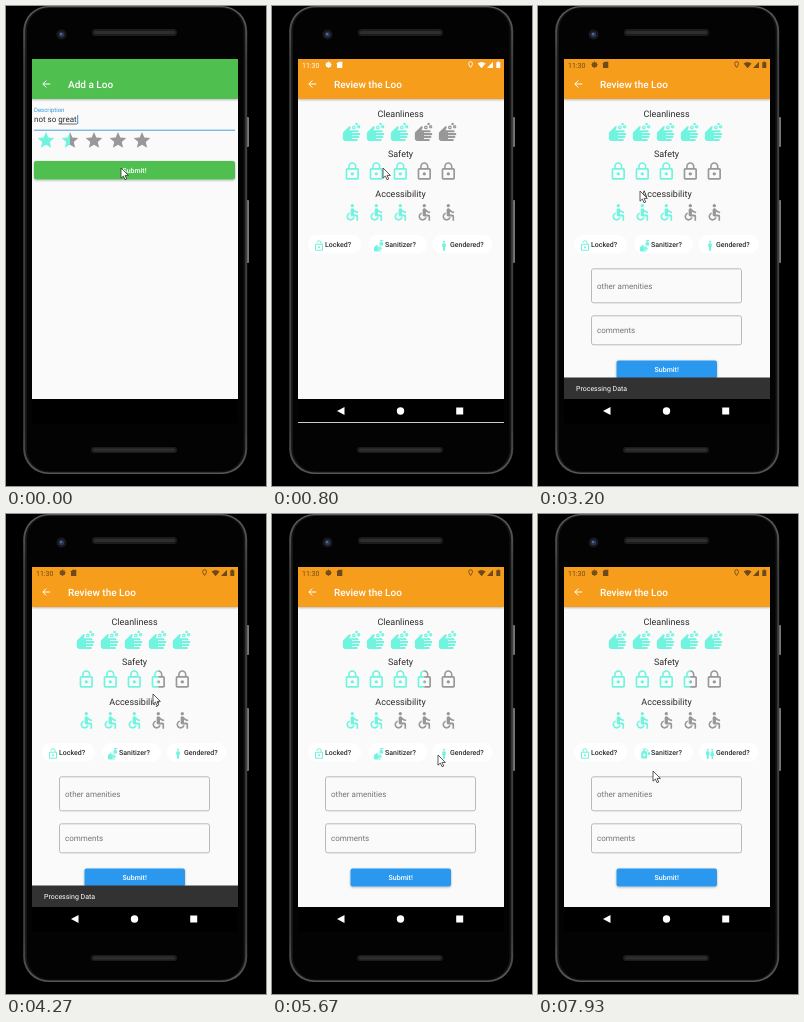
Write an HTML page that moves like this. It is 260x480 px and loops after 8 s.

```html
<!DOCTYPE html>
<html lang="en">
<head>
<meta charset="utf-8">
<title>Loo review</title>
<style>
  html, body { margin: 0; width: 100%; height: 100%; overflow: hidden; background: #000; }
  svg { display: block; width: 260px; height: 480px; font-family: Roboto, sans-serif; filter: blur(.3px); text-rendering: geometricPrecision; }
  .m { font-weight: 500; }
  .c { text-anchor: middle; }
</style>
</head>
<body>
<script>
const LOOP = 8000, STEP = 1000 / 15;
const TEAL = '#70f4df', GREY = '#989898', GREEN = '#50c04f', ORANGE = '#f79d1e', INK = '#2c2c2c';

// ---- markup helpers
const rect = (x, y, w, h, fill, r = 0, more = '') =>
  `<rect x="${x}" y="${y}" width="${w}" height="${h}" rx="${r}" fill="${fill}" ${more}/>`;
const text = (x, y, size, fill, str, cls = '') =>
  `<text x="${x}" y="${y}" font-size="${size}" fill="${fill}" class="${cls}">${str}</text>`;
const path = (d, more = '') => `<path d="${d}" ${more}/>`;
const line = (d, color, w = 1) => path(d, `fill="none" stroke="${color}" stroke-width="${w}"`);
const dot = (x, y, r, more = '') => `<circle cx="${x}" cy="${y}" r="${r}" ${more}/>`;
const ring = (x, y, r) => dot(x, y, r, 'fill="none" stroke="currentColor" stroke-width="1.5"');
const group = (id, body, more = '') => `<g id="${id}" ${more}>${body}</g>`;

// ---- icons on a 24 unit grid
const lockDot = 'M12 17c1.1 0 2-.9 2-2s-.9-2-2-2-2 .9-2 2 .9 2 2 2zm6-9h-1V6c0-2.76-2.24-5-5-5S7 3.24 7 6';
const washing = path('M9.1 5L1.9 11.8C1.3 12.4 1 13.1 1 14V20c0 1.7 1.3 3 3 3h13.75a1.25 1.25 0 0 0 0-2.5H12v-1h7.75a1.25 1.25 0 0 0 0-2.5H12v-1h8.75a1.25 1.25 0 0 0 0-2.5H12v-1h6.75a1.25 1.25 0 0 0 0-2.5H8.9L10.3 7.4Q10.8 6.600 10.200 5.900z');
const icons = {
  star: path('M12 17.27L18.18 21l-1.64-7.03L22 9.24l-7.19-.61L12 2 9.19 8.63 2 9.24l5.46 4.73L5.82 21z'),
  lock: path(lockDot + 'v2H6c-1.1 0-2 .9-2 2v10c0 1.1.9 2 2 2h12c1.1 0 2-.9 2-2V10c0-1.1-.9-2-2-2zM8.9 6c0-1.71 1.39-3.1 3.1-3.1s3.1 1.39 3.1 3.1v2H8.9V6zM18 20H6V10h12v10z'),
  open: path(lockDot + 'h1.9c0-1.71 1.39-3.1 3.1-3.1s3.1 1.39 3.1 3.1v2H6c-1.1 0-2 .9-2 2v10c0 1.1.9 2 2 2h12c1.1 0 2-.9 2-2V10c0-1.1-.9-2-2-2zm0 12H6V10h12v10z'),
  chair: dot(12, 4, 2) + path('M19 13v-2c-1.54.02-3.09-.75-4.07-1.83l-1.29-1.43c-.17-.19-.38-.34-.61-.45H13c-.35-.2-.75-.3-1.19-.26C10.76 7.11 10 8.04 10 9.09V15c0 1.1.9 2 2 2h5v5h2v-5.5c0-1.1-.9-2-2-2h-3v-3.45c1.29 1.07 3.25 1.94 5 1.95zm-6.17 5c-.41 1.16-1.52 2-2.83 2-1.66 0-3-1.34-3-3 0-1.31.84-2.41 2-2.83V12.1c-2.28.46-4 2.48-4 4.9 0 2.76 2.24 5 5 5 2.42 0 4.44-1.72 4.9-4h-2.07z'),
  hand: washing + ring(14.25, 6.75, 1.5) + ring(20, 6, 1.3) + dot(17.5, 2.5, 1.5),
  rinse: `<g transform="translate(0 6) scale(.78)">${washing}</g>` +
    path('M12 8q0-2.500 2.500-3V3H13V1h4q2.500 0 3 2h-3.500v2Q19 5.500 19 8v4h-7z'),
  bottle: path('M15.5 6.5C15.5 5.7 17 4 17 4s1.5 1.7 1.5 2.5a1.5 1.5 0 0 1-3 0zM19.5 15a2.5 2.5 0 0 0 2.5-2.5C22 10.8 19.5 8 19.5 8S17 10.8 17 12.5a2.5 2.5 0 0 0 2.5 2.5zM13 14h-2v-2H9v2H7v2h2v2h2v-2h2zM16 12v8a2 2 0 0 1-2 2H6a2 2 0 0 1-2-2v-8a6 6 0 0 1 5-5.9V4H7V2h6q1.700 0 3 1L14.600 4.500Q13.800 4 13 4h-2v2.100A6 6 0 0 1 16 12z'),
  person: dot(12, 4, 2) + path('M10 22v-7.5H8.500V9a2 2 0 0 1 2-2h3a2 2 0 0 1 2 2v5.500H14V22z'),
  pair: dot(7.5, 4, 2) + dot(16.5, 4, 2) +
    path('M5.5 22v-7.5H4V9a2 2 0 0 1 2-2h3a2 2 0 0 1 2 2v5.5H9.5V22zM18 22v-6h3l-2.5-7.600a2 2 0 0 0-4 0L12 16h3v6z'),
};
const icon = (name, x, y, size, color, more = '') =>
  `<g transform="translate(${x} ${y}) scale(${size / 24})" fill="${color}" color="${color}" ${more}>${icons[name]}</g>`;

// A row of five marks; two clips divide it into lit and unlit parts
const ratings = [];
function ratingRow(name, x, y) {
  const i = ratings.push(x) - 1;
  const layer = (side, color) =>
    `<clipPath id="${side}${i}"><rect y="${y - 3}" x="${x}" width="130" height="26"/></clipPath>` +
    `<g clip-path="url(#${side}${i})">` +
    [0, 1, 2, 3, 4].map(n => icon(name, x + n * 24, y, 20, color)).join('') + '</g>';
  return layer('on', TEAL) + layer('off', GREY);
}

const raised = (x, y, w, h, color, r) => rect(x, y, w, h, color, r, 'filter="url(#soft)"');
const appBar = (color, title) => raised(26, 53, 206, 40, color, 0) +
  line('M44.2 78H37M40.3 74.5L36.8 78l3.5 3.5', '#fff', 1) + text(62, 82, 10, '#fff', title, 'm');

// ---- keyboard
function keyboard() {
  const dark = '#ccd0d5', stroke = '#444';
  const key = (x, y, w, fill = '#fff') => rect(x, y + 1, w, 23, '#c3c6ca', 3) + rect(x, y, w, 23, fill, 3);
  const letters = (str, cx, y) => [...str].map((ch, i) =>
    key(cx + i * 20.3 - 8.8, y, 17.6) + text(cx + i * 20.3, y + 15.5, 12, '#2b2d30', ch, 'c')).join('');
  const words = ['great', 'greatly', 'greatest'];
  return rect(26, 252, 206, 142, '#e8eaed') +
    dot(38.5, 263.5, 7.5, 'fill="#fff"') + line('M37.3 260.8l2.7 2.7-2.7 2.7', '#555', 1.1) +
    words.map((w, i) => text(71 + i * 57, 267, 9, '#3c4043', w, 'c')).join('') +
    line('M98.5 258v12M158.5 258v12', '#c8cacd', 0.8) +
    rect(219.7, 258.5, 3.4, 6.5, stroke, 1.7) + line('M218 263a3.4 3.4 0 0 0 6.8 0M221.4 266.5v2.5', stroke, 0.9) +
    letters('qwertyuiop', 37.4, 278) +
    [...'1234567890'].map((d, i) => text(43.4 + i * 20.3, 284, 5, '#666', d, 'c')).join('') +
    letters('asdfghjkl', 47.5, 307) + letters('zxcvbnm', 67.6, 336.5) +
    [28, 201].map(x => key(x, 336.5, 28, dark)).join('') +
    line('M42 342.5l-5.5 6h3v4.5h5v-4.5h3z', stroke) +
    line('M212 343.5h9v9h-9l-4-4.5zM214 346l4 4m0-4l-4 4', stroke) +
    key(28, 365.5, 28, dark) + text(42, 380.5, 8, '#3c4043', '?123', 'c') +
    key(59, 365.5, 17.5, dark) + text(67.7, 380, 11, '#3c4043', ',', 'c') +
    key(79, 365.5, 17.5) + key(99, 365.5, 79) +
    key(181, 365.5, 17.5, dark) + text(189.7, 380, 11, '#3c4043', '.', 'c') +
    dot(88, 377, 4.6, 'fill="none" stroke="#444"') + line('M85.7 378.2q2.3 2.8 4.6 0', stroke, 0.9) +
    dot(86.4, 375.7, 0.7, 'fill="#444"') + dot(89.6, 375.7, 0.7, 'fill="#444"') +
    key(201, 365.5, 28, '#2273e0') + line('M211 377.5l2.8 2.8 5.6-6', '#fff', 1.2);
}

// ---- pages
const addPage = rect(26, 53, 206, 340, '#fafafa') + appBar(GREEN, 'Add a Loo') +
  text(28, 106, 6, '#3498db', 'Description') + text(28, 116, 8, INK, 'not so great') +
  line('M52.5 118h18.5', INK, 0.7) + line('M28 124.2h201', '#4a9fdb') +
  group('caret', rect(71.2, 109, 1, 9, '#3c8fd0')) + ratingRow('star', 30, 124.3) +
  raised(28, 155, 201, 18.5, GREEN, 2) +
  `<g clip-path="url(#btn)">${dot(115, 164, 0, 'id="ripple" fill="#fff" opacity=".16"')}</g>` +
  text(128.5, 166.8, 7, '#fff', 'Submit!', 'c m');

const pill = (id, x, w, tx, label) => rect(x, 229, w, 18.5, '#fff', 9.2) +
  rect(x, 229, w, 18.5, '#000', 9.2, `id="${id}" opacity="0"`) + text(tx, 240.8, 7, INK, label, 'm');
const field = (y, h, label) => rect(53.5, y, 150, h, 'none', 2, 'stroke="#aaa" stroke-width=".8"') +
  text(59, y + h / 2 + 2.7, 8, '#757575', label);
const headings = ['Cleanliness', 'Safety', 'Accessibility'];

const reviewPage = rect(26, 53, 206, 340, '#fafafa') + appBar(ORANGE, 'Review the Loo') +
  headings.map((s, i) => text(128.5, 111 + i * 40.2, 9, INK, s, 'c')).join('') +
  ratingRow('hand', 70, 115.8) + ratingRow('lock', 70.3, 155.3) + ratingRow('chair', 70.3, 196.3) +
  pill('tapLock', 36, 53, 53, 'Locked?') + pill('tapSan', 96, 59, 113, 'Sanitizer?') + pill('tapGen', 160.5, 60, 178, 'Gendered?') +
  icon('open', 41, 233.8, 12, TEAL, 'id="lockOff"') + icon('lock', 41, 233.8, 12, TEAL, 'id="lockOn"') +
  icon('rinse', 101.5, 233.5, 12, TEAL, 'id="sanOff"') + icon('bottle', 101.2, 233.5, 12, TEAL, 'id="sanOn"') +
  icon('person', 166, 233.8, 12, TEAL, 'id="genOff"') + icon('pair', 166, 233.8, 12, TEAL, 'id="genOn"') +
  group('form', field(262.8, 34, 'other amenities') + field(309.8, 29, 'comments') +
    raised(78.5, 354.5, 100.5, 18, '#2b98ee', 2) + text(128.7, 366.2, 7, '#fff', 'Submit!', 'c m'));

const status = text(30, 61.5, 7, 'currentColor', '11:30') +
  ring(56.5, 58.7, 1.8) + line('M56.5 55.4v6.6M53.2 58.7h6.6M54.2 56.4l4.6 4.6M58.8 56.4l-4.6 4.6', 'currentColor', 0.7) +
  path('M66.5 55.7h3.8v6.3h-5.3v-4.8z') +
  line('M198.6 55.7a1.9 1.9 0 0 1 1.9 1.9c0 1.4-1.9 3.9-1.9 3.9s-1.9-2.5-1.9-3.9a1.9 1.9 0 0 1 1.9-1.9', 'currentColor', 0.9) +
  path('M205.6 57.5q4-3 8 0l-4 4.7zM215 62l6-6.3V62zM224.3 56.2h1.2v-.8h1.6v.8h1.2V62h-4z');

const navIcons = back => path(back) + dot(128.5, 405, 3.7) + path('M184.2 401.5h7v7h-7z');

const defs = `<defs>
  <clipPath id="screen"><rect x="26" y="53" width="206" height="364.5"/></clipPath>
  <clipPath id="view"><rect x="26" y="53" width="206" height="340"/></clipPath>
  <clipPath id="btn"><rect x="28" y="155" width="201" height="18.5" rx="2"/></clipPath>
  <filter id="soft" x="-10%" y="-30%" width="120%" height="180%"><feDropShadow dx="0" dy=".8" stdDeviation=".9" flood-opacity=".3"/></filter>
  <linearGradient id="rim" x2="0" y2="1"><stop stop-color="#5c5c5c"/><stop offset=".12" stop-color="#3e3e3e"/>
    <stop offset=".9" stop-color="#3e3e3e"/><stop offset="1" stop-color="#565656"/></linearGradient></defs>`;

const phone = rect(240, 111, 3, 30, '#777', 1) + rect(240, 194, 3, 63, '#777', 1) +
  rect(17.2, 0, 224, 468, 'url(#rim)', 25) + rect(19.2, 1.2, 220, 465.3, '#141414', 23.5) +
  rect(21, 2, 216.5, 463.5, '#030303', 22.5) +
  rect(86, 23, 85, 7, '#1c1c1c', 3.5) + rect(88, 25, 81, 3, '#2e2e2e', 1.5) +
  rect(85, 441, 86, 6, '#1c1c1c', 3) + rect(87, 442.5, 82, 3, '#2e2e2e', 1.5) +
  dot(55.5, 28.5, 5, 'fill="#17191f"') + dot(55.5, 28.5, 2.6, 'fill="#2b3a58"') + dot(55, 28, 1, 'fill="#6077a0"');

document.body.innerHTML = `<svg viewBox="0 0 260 480">${defs}${phone}<g clip-path="url(#screen)">` +
  rect(26, 393, 206, 25, '#000') +
  `<g clip-path="url(#view)">${group('add', addPage)}${group('review', reviewPage)}${group('keys', keyboard())}` +
  group('snack', rect(26, 371.5, 206, 22, '#323232') + text(38, 385, 7, '#fff', 'Processing Data')) + '</g>' +
  group('status', status) +
  group('navLight', rect(26, 393, 206, 24.5, '#f7f7f7') + navIcons('M65 402h8.5l-4.250 7z'), 'fill="#555"') +
  group('navDark', navIcons('M72.5 401v8l-7.5-4z') + rect(26, 416, 206, 1, '#ccc', 0, 'id="edge"'), 'fill="#fff"') + '</g>' +
  group('mouse', path('M0 0V10.2L2.4 8 4 11.7 5.7 11 4.1 7.4H7.4Z', 'fill="#fff" stroke="#333" stroke-width=".8"')) + '</svg>';

// ---- motion
const $ = id => document.getElementById(id);
const show = (id, on) => { $(id).style.display = on ? '' : 'none'; };
const set = (id, name, v) => $(id).setAttribute(name, v);
const ramp = (t, a, b) => Math.min(1, Math.max(0, (t - a) / (b - a)));
const ease = k => 1 - (1 - k) ** 2;

const mousePath = [
  [0, 115, 162], [600, 115, 162], [730, 111, 162], [1070, 111, 162], [1400, 180, 127],
  [1600, 180, 127], [1730, 186, 126], [1870, 187, 127], [2130, 186, 127], [2330, 181, 127],
  [2600, 181, 127], [2930, 115, 162], [3070, 82, 176], [3270, 112, 190], [3470, 142, 159],
  [3670, 146, 163], [3930, 147, 166], [4070, 147, 166], [4270, 147, 180],
  [4600, 120, 201], [4930, 110, 206], [5200, 110, 206], [5670, 166, 241], [5800, 177, 241],
  [6330, 177, 241], [6870, 60, 243], [7270, 60, 243], [7470, 104, 241], [7730, 104, 241], [7930, 115, 257],
];
function mouseAt(t) {
  const i = mousePath.findIndex(k => k[0] > t);
  if (i < 0) return mousePath.at(-1).slice(1);
  const [a, b] = [mousePath[i - 1], mousePath[i]], k = ramp(t, a[0], b[0]);
  return [1, 2].map(n => Math.round(a[n] + (b[n] - a[n]) * k));
}

function rate(i, value) {
  const x = ratings[i], w = Math.floor(value) * 24 + (value % 1) * 20;
  $('on' + i).firstChild.setAttribute('width', w);
  $('off' + i).firstChild.setAttribute('x', x + w);
}

function toggle(name, on) {
  show(name + 'Off', !on);
  show(name + 'On', on);
}

function draw(t) {
  const awake = t >= 265, page = ease(ramp(t, 590, 800)), typing = awake && t < 790;
  const tint = t < 1125 ? '#fff' : '#6d4a1d';
  show('caret', !awake);
  show('status', awake);
  set('status', 'fill', tint);
  set('status', 'color', tint);
  show('keys', typing);
  set('keys', 'transform', `translate(0 ${142 * ramp(t, 600, 800)})`);
  show('navLight', typing);
  show('navDark', t >= 790);
  show('edge', t < 1065);
  set('ripple', 'r', 33 * ramp(t, 390, 530) + 90 * ramp(t, 530, 800));

  show('review', page > 0);
  set('review', 'opacity', page);
  set('review', 'transform', `translate(0 ${60 * (1 - page)})`);
  show('form', t >= 860);
  const snack = ease(ramp(t, 800, 1060)) * (1 - ramp(t, 4900, 5130));
  show('snack', snack > 0);
  set('snack', 'transform', `translate(0 ${22 * (1 - snack)})`);

  rate(0, 1.5);
  rate(1, t < 2460 ? 3 : 5);
  rate(2, t < 4125 ? 3 : 3.5);
  rate(3, t < 5060 ? 3 : 2);

  toggle('gen', t >= 6125);
  toggle('lock', t >= 7325);
  toggle('san', t >= 7725);
  set('tapLock', 'opacity', t >= 7065 && t < 7325 ? 0.04 : 0);
  set('tapSan', 'opacity', t >= 7725 && t < 7900 ? 0.04 : 0);

  set('mouse', 'transform', `translate(${mouseAt(t)})`);
}

const start = performance.now();
function tick() {
  const t = (performance.now() - start) % LOOP;
  draw(Math.floor((t + 4) / STEP) * STEP);
  requestAnimationFrame(tick);
}
tick();
</script>
</body>
</html>
```
